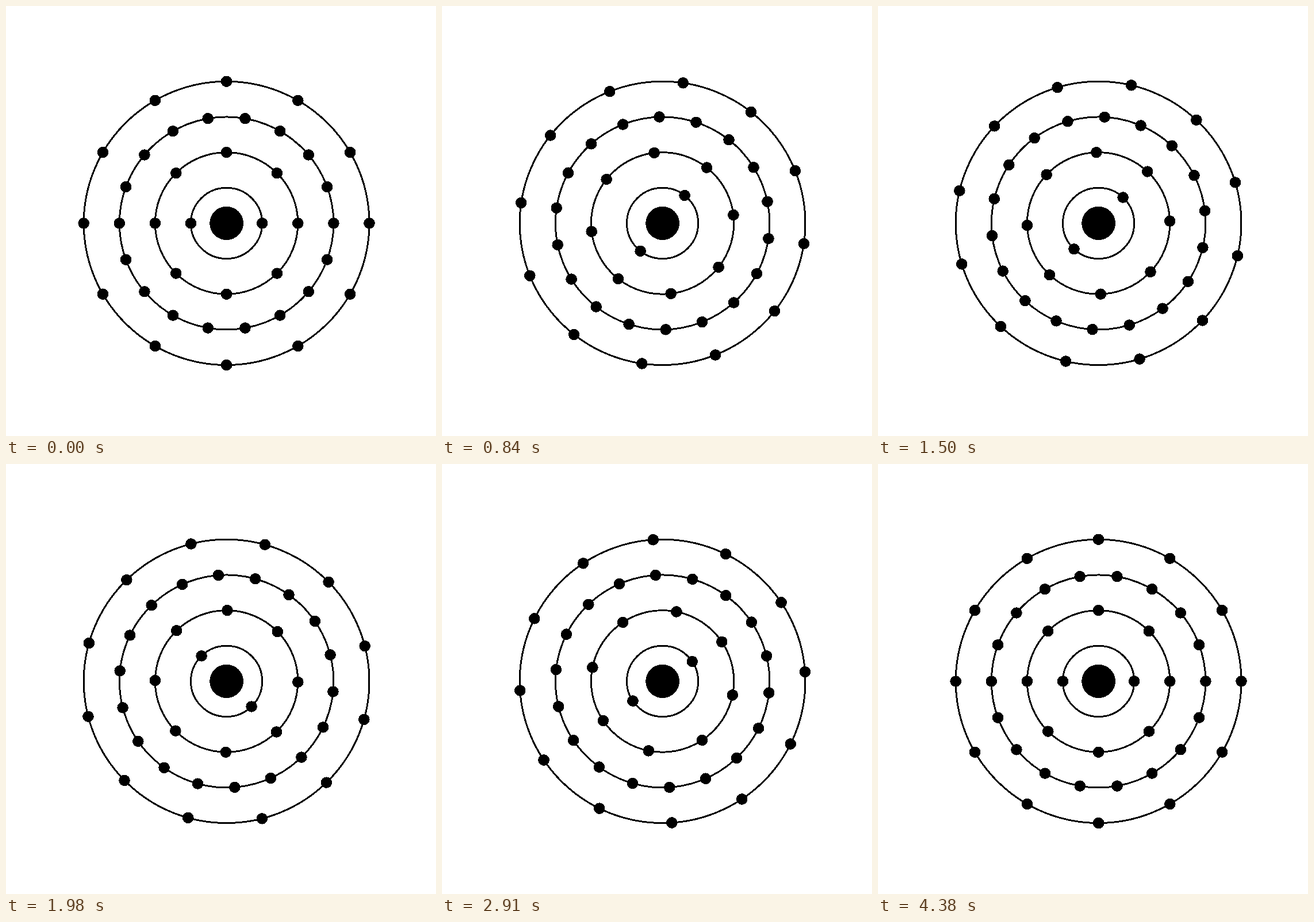
Write an HTML page that moves like this. It is 748 px wide and 748 px high and loops after 4510 ms.

```html
<!DOCTYPE html>
<html lang="en">
<head>
<meta charset="utf-8">
<title>Atom shells</title>
<style>
  html, body { margin: 0; width: 100%; height: 100%; overflow: hidden; background: #fff; }
  svg { display: block; width: 100%; height: 100%; }
</style>
</head>
<body>
<svg viewBox="0 0 748 748" shape-rendering="crispEdges">
  <g transform="translate(383.6 377.9) scale(1 .993)">
    <circle r="29.4"/>
    <g id="rings" fill="none" stroke="#000" stroke-width="3"></g>
    <g id="electrons"></g>
  </g>
</svg>
<script>
const LOOP = 4510, STEP = 30, STEPS = 150, LAST_STEP = 146;
const SHELL_GAP = 62.1, DOT_RADIUS = 9.8;
const SHELLS = [2, 8, 18, 12];
const rings = document.getElementById("rings");
const electrons = document.getElementById("electrons");

function addCircle(parent, r, x = 0, y = 0) {
  const circle = document.createElementNS("http://www.w3.org/2000/svg", "circle");
  const attributes = { r, cx: x, cy: y };
  for (const name in attributes) circle.setAttribute(name, attributes[name]);
  parent.append(circle);
}

SHELLS.forEach((count, shell) => {
  const radius = SHELL_GAP * (shell + 1);
  addCircle(rings, radius);
  for (let i = 0; i < count; i++) {
    const angle = 2 * Math.PI * i / count;
    addCircle(electrons, DOT_RADIUS, radius * Math.cos(angle), radius * Math.sin(angle));
  }
});

// Brief cubic acceleration, then a long cubic slow-down.
function ease(x, split = 0.03) {
  return x < split
    ? split * (x / split) ** 3
    : 1 - (1 - split) * ((1 - x) / (1 - split)) ** 3;
}

const start = performance.now();

function draw() {
  const time = (performance.now() - start) % LOOP;
  const step = Math.min(Math.floor(time / STEP), LAST_STEP);
  electrons.setAttribute("transform", `rotate(${720 * ease(step / STEPS)})`);
  requestAnimationFrame(draw);
}
draw();
</script>
</body>
</html>
```
